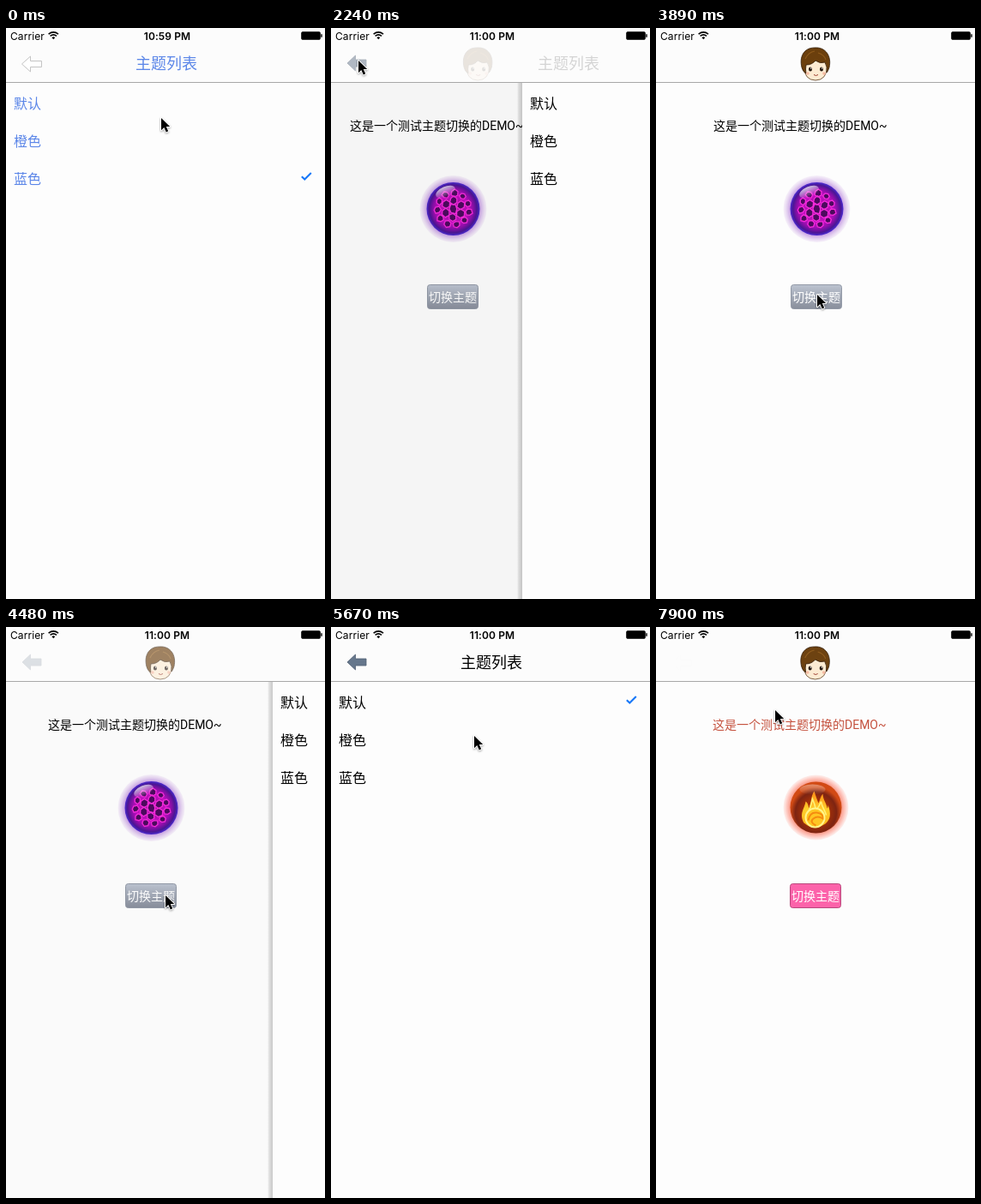
These frames come from a looping animation (372x666 px, 8 s). An HTML page:

```html
<!DOCTYPE html>
<html lang="zh">
<head>
<meta charset="utf-8">
<title>主题切换</title>
<style>
html, body { margin: 0; width: 100%; height: 100%; overflow: hidden; background: #fdfdfd; }
svg { display: block; width: 372px; height: 666px; }
text { font-family: "Noto Sans CJK SC", "Noto Sans CJK", "Noto Sans", sans-serif; white-space: pre; }
.status { font: 400 12px Inter, sans-serif; letter-spacing: .1px; }
.clock { font-weight: 600; text-anchor: middle; }
.title { font-size: 18px; font-weight: 500; text-anchor: middle; }
.row { font-size: 16px; font-weight: 500; }
.label { font-size: 14px; font-family: Roboto, "Noto Sans CJK SC", "Noto Sans CJK", sans-serif; }
.button { font-size: 14px; fill: #fff; text-anchor: middle; }
</style>
</head>
<body>
<svg viewBox="0 0 372 666">
  <defs>
    <linearGradient id="edge">
      <stop offset="0" stop-opacity="0"/><stop offset=".3" stop-opacity=".1"/><stop offset="1" stop-opacity=".2"/>
    </linearGradient>
    <linearGradient id="steel" x2="0" y2="1">
      <stop offset="0" stop-color="#bcc3d0"/><stop offset="1" stop-color="#888e9b"/>
    </linearGradient>
    <radialGradient id="violetGlow">
      <stop offset=".74" stop-color="#8a32c8" stop-opacity=".6"/><stop offset=".9" stop-color="#b27ad6" stop-opacity=".33"/>
      <stop offset="1" stop-color="#c79be0" stop-opacity=".12"/>
    </radialGradient>
    <radialGradient id="violet">
      <stop offset="0" stop-color="#8d0c92"/><stop offset=".55" stop-color="#c80fc4"/>
      <stop offset=".76" stop-color="#8a0fa8"/><stop offset=".9" stop-color="#4a1695"/><stop offset="1" stop-color="#4b2bd0"/>
    </radialGradient>
    <radialGradient id="redGlow">
      <stop offset=".74" stop-color="#f0401c" stop-opacity=".65"/><stop offset=".9" stop-color="#ff7460" stop-opacity=".38"/>
      <stop offset="1" stop-color="#ff9a8a" stop-opacity=".14"/>
    </radialGradient>
    <radialGradient id="ember" cy=".6">
      <stop offset="0" stop-color="#e05a08"/><stop offset=".45" stop-color="#a83208"/>
      <stop offset=".8" stop-color="#7d2412"/><stop offset="1" stop-color="#d24a14"/>
    </radialGradient>
    <linearGradient id="flame" x2="0" y2="1">
      <stop offset="0" stop-color="#ff8a14"/><stop offset=".5" stop-color="#ffd02c"/><stop offset="1" stop-color="#ffb31a"/>
    </linearGradient>
    <linearGradient id="gloss" x2="0" y2="1">
      <stop offset="0" stop-color="#fff" stop-opacity=".75"/><stop offset="1" stop-color="#fff" stop-opacity="0"/>
    </linearGradient>
  </defs>

  <rect width="372" height="666" fill="#fdfdfd"/>

  <g id="demo">
    <text class="label" id="label" x="67" y="119">这是一个测试主题切换的DEMO~</text>
    <g id="violetOrb" transform="translate(187.5 211)">
      <circle r="39" fill="url(#violetGlow)"/>
      <circle r="31" fill="url(#violet)"/>
      <g id="cells" fill="#4c0a5e" stroke="#f52bdc" stroke-width="1.3"/>
      <ellipse cx="-9" cy="-20" rx="12" ry="6" transform="rotate(-24 -9 -20)" fill="url(#gloss)"/>
    </g>
    <g id="fireOrb" transform="translate(187.5 210.5)">
      <circle r="38" fill="url(#redGlow)"/>
      <circle r="30" fill="url(#ember)"/>
      <path d="M-14 18C-20 7-13 1-12-7C-9-5-9-2-8 1C-5-7-6-13-2-19C0-13 1-10 3-5C5-9 5-12 8-16C8-9 13-4 13 1C14 0 14-1 14-3C18 7 17 14 11 19Q-2 28-14 18Z" fill="url(#flame)"/>
      <path d="M-10 8C-7 2-6-1-4-10Q-1-3 0 3Q4-1 6-7C7 0 11 4 12 9" fill="none" stroke="#fff37a" stroke-width="1.6"/>
      <circle cx="-1" cy="12" r="11" fill="#ffc623" stroke="#fff58c" stroke-width="2"/>
      <path d="M-9 15Q-7 5 1 6T8 13Q2 9-3 13T0 21" fill="none" stroke="#f58b10" stroke-width="2"/>
      <ellipse cx="-4" cy="-21" rx="15" ry="6" fill="url(#gloss)" opacity=".5"/>
    </g>
    <rect id="button" x="157.5" y="299.5" width="59" height="28" rx="3"/>
    <text class="button" x="187" y="319">切换主题</text>
  </g>
  <rect id="dim" width="372" height="666"/>

  <g id="list">
    <rect id="shade" x="-6" y="64" width="6" height="602" fill="url(#edge)"/>
    <rect width="372" height="666" fill="#fdfdfd"/>
    <rect id="press" width="372" height="44" fill="#d9d9d9"/>
    <g id="rows">
      <text class="row" x="9" y="94">默认</text>
      <text class="row" x="9" y="138">橙色</text>
      <text class="row" x="9" y="182">蓝色</text>
    </g>
    <path id="check" d="M344.8 85.3L348.3 88.6L355.8 81" fill="none" stroke="#1878f8" stroke-width="2.1"/>
  </g>

  <rect width="372" height="63" fill="#fcfcfc"/>
  <rect y="63" width="372" height="1" fill="#a8a8a8"/>
  <g id="avatar">
    <path d="M172 44Q173 61 186 61T200 44V36H172Z" fill="#fdebd2" stroke="#5b3b1c" stroke-width=".8"/>
    <path d="M170 46C167 34 172 23 185 23C198 22 205 33 202 46C201 49 200 51 199 52Q200 45 197 40Q191 42 186 38Q182 43 175 43Q174 48 175 53Q171 51 170 46Z" fill="#6b3f0d" stroke="#2f1a06" stroke-width=".8"/>
    <path d="M174 36Q178 28 185 27M189 29Q196 31 198 37" fill="none" stroke="#8e5a1c" stroke-width="1.2"/>
    <g fill="#20140c"><ellipse cx="180" cy="48" rx="2" ry="2.6"/><ellipse cx="193" cy="48" rx="2" ry="2.6"/></g>
    <g fill="#fff"><circle cx="180.7" cy="47" r=".8"/><circle cx="193.7" cy="47" r=".8"/></g>
    <g fill="#f6b9a2"><circle cx="177" cy="53" r="1.8"/><circle cx="196" cy="53" r="1.8"/></g>
    <path d="M184 54.5Q186.5 56.5 189 54.5" fill="none" stroke="#9c3f30"/>
  </g>
  <g id="back">
    <path id="solid" d="M19 41L28.5 32V37H41V45H28.5V50Z" fill="#66778c" stroke="#526074" stroke-width=".8"/>
    <path id="hollow" d="M18.5 42L28.5 33V38.5H41.5V45.5H28.5V51Z" fill="#fff" stroke="#c4c4c4"/>
  </g>
  <text class="title" id="title" x="187" y="47.5">主题列表</text>

  <text class="status" x="5" y="14">Carrier</text>
  <g transform="translate(55.3 13.3)">
    <path d="M0 0L-1.9-2.1Q0-3.8 1.9-2.1Z"/>
    <path d="M-3.7-4Q0-7 3.7-4M-5.7-6.2Q0-10.7 5.7-6.2" fill="none" stroke="#000" stroke-width="1.6"/>
  </g>
  <text class="status clock" id="clock" x="188" y="14"></text>
  <rect x="344.5" y="4.5" width="22" height="9" rx="1.5" stroke="#000" stroke-width=".6"/>
  <rect x="367.3" y="7" width="1.4" height="4" rx=".7"/>

  <path id="cursor" d="M0 0V14.2L3.3 11L5.8 16.4L8.2 15.3L5.8 10.1H10.2Z" stroke="#fff" stroke-width="2" stroke-linejoin="round" paint-order="stroke"
    style="filter: drop-shadow(0 1px 1px rgba(0,0,0,.35))"/>
</svg>
<script>
const LOOP = 8000, WIDTH = 372;
const el = id => document.getElementById(id);
const clamp = v => Math.max(0, Math.min(1, v));
const move = (id, x, y = 0) => el(id).setAttribute('transform', `translate(${x} ${y})`);
const set = (id, name, value) => el(id).setAttribute(name, value);
const show = (id, on) => el(id).style.display = on ? '' : 'none';

// The picture advances in ticks of about 150 ms; a few ticks are 10 ms shorter.
const SHORT = [15, 29, 38, 45, 50];
const startOf = n => 150 * n - 10 * SHORT.filter(s => s <= n).length;
const TICKS = Array.from({ length: 54 }, (_, n) => startOf(n));

const THEMES = {
  plain: { color: '#000', row: 0, fill: 'url(#steel)', border: '#9299a6' },
  orange: { color: '#c5523f', row: 1, fill: '#fc63aa', border: '#b9487c' },
  blue: { color: '#5b86e8', row: 2, fill: 'url(#steel)', border: '#9299a6' }
};

// [tick, x, y]
const POINTER = [
  [0, 181, 105], [1, 180, 105], [3, 180, 105], [5, 181, 88], [6, 181, 88], [7, 172, 99], [8, 172, 99],
  [9, 168, 98], [10, 150, 84], [12, 52, 46], [13, 32, 38], [16, 32, 38], [17, 50, 46], [20, 238, 91],
  [22, 232, 185], [23, 203, 255], [26, 188, 311], [27, 186, 313], [31, 186, 313], [35, 174, 119],
  [36, 174, 119], [37, 170, 125], [38, 167, 127], [44, 167, 127], [47, 68, 63], [48, 38, 44],
  [51, 32, 38], [52, 58, 58], [53, 139, 97]
];

const SLIDE = [.02, .164, .6, .88, .97, 1];
const POP = [.16, .6, .9, .991, 1];

function pointerAt(n) {
  const i = POINTER.findIndex(p => p[0] >= n);
  const b = POINTER[i], a = POINTER[Math.max(0, i - 1)];
  const f = b[0] === a[0] ? 0 : (n - a[0]) / (b[0] - a[0]);
  return [1, 2].map(k => Math.round(a[k] + (b[k] - a[k]) * f));
}

// How far the list covers the demo page, 0 to 1.
function coverAt(n) {
  const step = (table, from) => table[Math.min(n - from, table.length - 1)];
  if (n >= 50) return 1 - step(POP, 50);
  if (n >= 29) return step(SLIDE, 29);
  return n >= 14 ? 1 - step(POP, 14) : 1;
}

function buildCells() {
  let seed = 7;
  const rand = () => (seed = seed * 16807 % 2147483647) / 2147483647;
  const cell = (cx, cy, rx, ry, turn) => {
    const points = Array.from({ length: 6 }, (_, i) => {
      const a = i * Math.PI / 3 + turn, k = .85 + rand() * .35;
      return [cx + Math.cos(a) * rx * k, cy + Math.sin(a) * ry * k].map(v => v.toFixed(1));
    });
    return `M${points.join('L')}Z`;
  };
  let d = cell(0, 0, 5, 5.5, 0);
  for (const [count, r, size] of [[6, 10, 4.6], [11, 18.5, 3.9]])
    for (let i = 0; i < count; i++) {
      const a = i / count * 2 * Math.PI + r;
      d += cell(Math.cos(a) * r, Math.sin(a) * r, size, size, a);
    }
  el('cells').innerHTML = `<path d="${d}"/>`;
}

function draw(n) {
  const theme = THEMES[n < 5 ? 'blue' : n < 43 ? 'plain' : 'orange'];
  const plain = theme === THEMES.plain, fire = theme === THEMES.orange;
  const cover = coverAt(n);

  move('demo', Math.round(-.3 * WIDTH * cover));
  move('list', Math.round(WIDTH * (1 - cover)));
  set('dim', 'opacity', .08 * cover);
  set('shade', 'opacity', clamp((cover - .01) * 6.5));

  move('avatar', -37 * cover);
  set('avatar', 'opacity', clamp(1 - 2.2 * cover));
  set('back', 'opacity', clamp(1.25 * cover));
  move('title', 150 * (1 - cover));
  set('title', 'opacity', clamp((cover - .3) / .65));

  for (const id of ['label', 'rows', 'title']) set(id, 'fill', theme.color);
  set('button', 'fill', theme.fill);
  set('button', 'stroke', theme.border);
  move('check', 0, 44 * theme.row);
  show('solid', plain);
  show('hollow', !plain);
  show('violetOrb', !fire);
  show('fireOrb', fire);

  show('press', n === 4 || n === 42);
  set('press', 'y', n === 42 ? 108 : 64);
  el('clock').textContent = n < 5 ? '10:59 PM' : '11:00 PM';
  move('cursor', ...pointerAt(n));
}

let last = -1;
function frame() {
  const t = performance.now() % LOOP;
  const n = TICKS.filter(s => s <= t).length - 1;
  if (n !== last) draw(last = n);
  requestAnimationFrame(frame);
}

buildCells();
frame();
</script>
</body>
</html>
```
